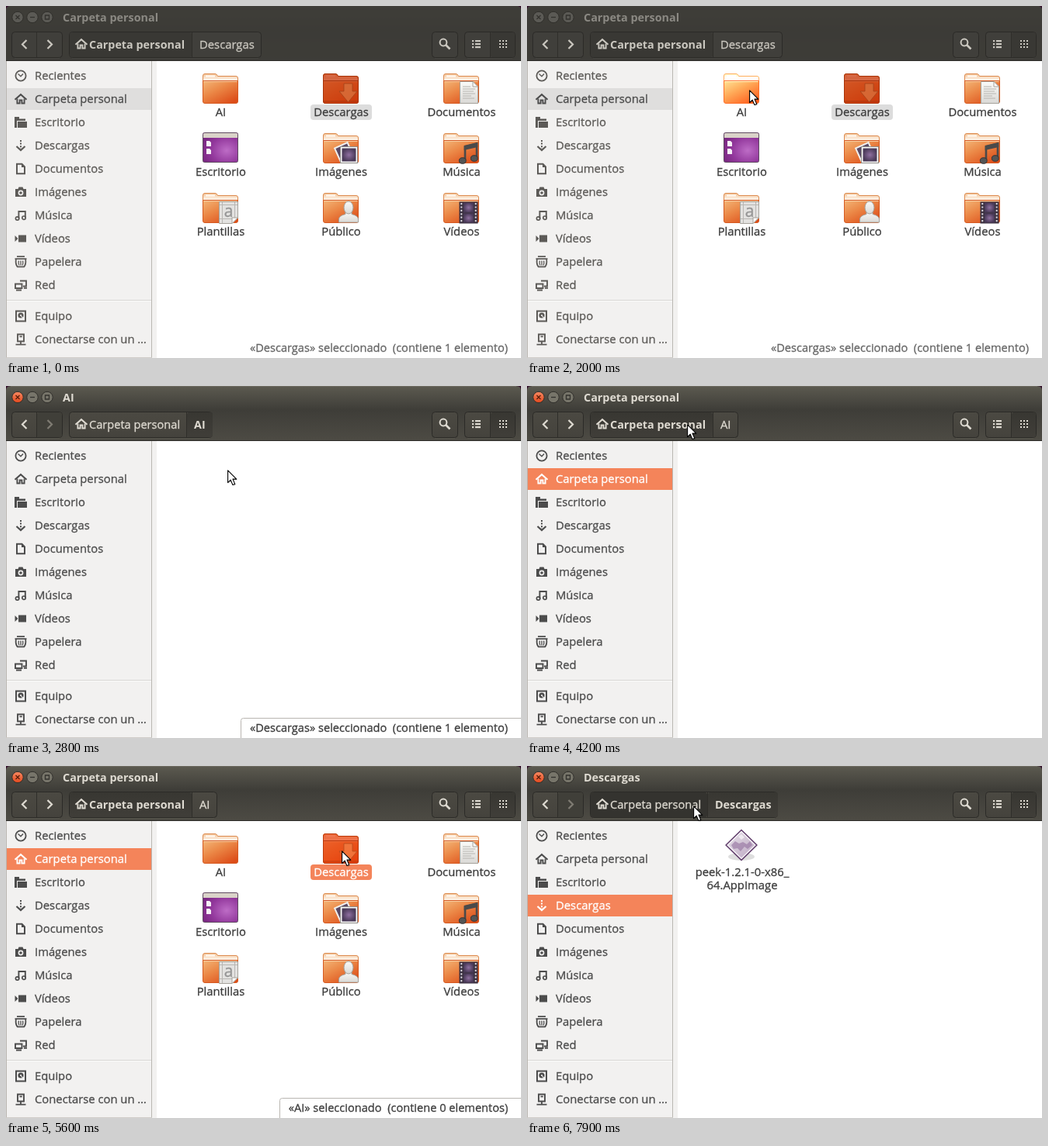
An HTML page that plays this animation: 663 px wide and 454 px high, repeating every 8 s.

```html
<!DOCTYPE html>
<html lang="es">
<head>
<meta charset="utf-8">
<style>
html, body { margin: 0; width: 100%; height: 100%; overflow: hidden; background: #fff; }
svg { display: block; width: 663px; height: 454px; font: 14.8px 'Open Sans', sans-serif; }
.b { font-weight: 700; font-size: 14.35px; stroke: none; }
.m { text-anchor: middle; }
.note { font-size: 14.6px; }
.letter { font-size: 21px; }
</style>
</head>
<body>
<svg viewBox="0 0 663 454">
  <defs>
    <linearGradient id="title" x2="0" y2="1"><stop stop-color="#5c5a50"/><stop offset="1" stop-color="#3e3d38"/></linearGradient>
    <linearGradient id="bar" x2="0" y2="1"><stop stop-color="#3e3d38"/><stop offset="1" stop-color="#4d4b44"/></linearGradient>
    <linearGradient id="btn" x2="0" y2="1"><stop stop-color="#4b4942"/><stop offset="1" stop-color="#45433d"/></linearGradient>
    <linearGradient id="on" x2="0" y2="1"><stop stop-color="#383732"/><stop offset="1" stop-color="#403e39"/></linearGradient>
    <linearGradient id="close" x2="0" y2="1"><stop stop-color="#f88a63"/><stop offset="1" stop-color="#e0481d"/></linearGradient>
    <linearGradient id="back" x2="0" y2="1"><stop stop-color="#f3c396"/><stop offset=".22" stop-color="#fdf3e8"/></linearGradient>
    <linearGradient id="front" x2=".8" y2="1"><stop stop-color="#f3b577"/><stop offset=".45" stop-color="#eb8746"/><stop offset="1" stop-color="#dc4c18"/></linearGradient>
    <radialGradient id="desk" cx=".68" cy=".6" r=".75"><stop stop-color="#bd6cc6"/><stop offset=".6" stop-color="#92389c"/><stop offset="1" stop-color="#782680"/></radialGradient>
    <radialGradient id="photo"><stop stop-color="#8f70a0"/><stop offset="1" stop-color="#4a3a58"/></radialGradient>
    <linearGradient id="paper" x2="0" y2="1"><stop stop-color="#fafaf8"/><stop offset="1" stop-color="#dad9d6"/></linearGradient>
    <linearGradient id="gem" x2="1" y2="1"><stop stop-color="#e9e4ea"/><stop offset="1" stop-color="#b9a3c0"/></linearGradient>
  </defs>
  <g id="scene"></g>
</svg>
<script>
const LOOP = 8000, STEP = 100;
const ORANGE = '#f4845a', INK = '#4c4c4c';
const HOME = 'Carpeta personal';
const scene = document.getElementById('scene');

const rect = (x, y, w, h, fill, more = '') => `<rect x="${x}" y="${y}" width="${w}" height="${h}" fill="${fill}" ${more}/>`;
const path = (d, fill, more = '') => `<path d="${d}" fill="${fill}" ${more}/>`;
const line = (d, color, w = 2, more = '') => path(d, 'none', `stroke="${color}" stroke-width="${w}" ${more}`);
const circle = (x, y, r, fill, more = '') => `<circle cx="${x}" cy="${y}" r="${r}" fill="${fill}" ${more}/>`;
const oval = (x, y, rx, ry, fill, more = '') => `<ellipse cx="${x}" cy="${y}" rx="${rx}" ry="${ry}" fill="${fill}" ${more}/>`;
// A hair of stroke gives the regular weight a little more body
const text = (s, x, y, fill, cls = '') => `<text x="${x}" y="${y}" fill="${fill}" stroke="${fill}" stroke-width=".3" class="${cls}">${s}</text>`;
const at = (x, y, body, more = '', turn = 0) => `<g transform="translate(${x} ${y}) rotate(${turn})" ${more}>${body}</g>`;

// Small symbolic icons, centred on the origin
const sym = {
  clock: c => circle(0, 0, 6.6, 'none', `stroke="${c}" stroke-width="1.8"`) + line('M-3.5-2.5L0 .8L3-2.5', c, 1.4),
  home: c => line('M-7.5.8L0-5.8L7.5.8', c) + line('M-4.6-.5V5.5H-1.4V1.5H1.4V5.5H4.6V-.5', c, 1.9),
  folder: c => path('M-8-7H-2V-4.5H6V-2H-5V7H-8Z', c) + path('M-4-1H8V7H-4Z', c),
  down: c => line('M-5.5 1L0 6L5.5 1', c, 2.2) + line('M0-7V4', c, 2, 'stroke-dasharray="2 1.6"'),
  doc: c => line('M-5-6.2H1.5L5-2.7V6.2H-5Z', c) + path('M1-6V-2H5Z', c),
  camera: c => path('M-7-4H-3.5L-2.5-6.5H2.5L3.5-4H7V6H-7Z', c) + circle(0, 1, 2.6, 'none', 'stroke="#f2f1f0" stroke-width="1.6"'),
  music: c => line('M-2.6 4V-5H5.8V3', c, 1.9) + circle(-4.4, 4, 2.2, 'none', `stroke="${c}" stroke-width="1.7"`) + circle(4, 3.2, 2.2, 'none', `stroke="${c}" stroke-width="1.7"`),
  video: c => rect(-3, -4.5, 10, 9, c) + path('M-7.5-4L-3.5 0L-7.5 4Z', c),
  trash: c => line('M-7.5-3.8H7.5M-5-6.8H5', c, 1.8) + line('M-6.2-3Q-7 3-4.2 6.4H4.2Q7 3 6.2-3', c, 1.8) + line('M-2.6-1.5Q-3.4 2-2 4.5M0-1.5V4.5M2.6-1.5Q3.4 2 2 4.5', c, 1.3),
  net: c => line('M-1-5.5H7V1.5H3M-7-1.5H1.5V4H-7Z', c, 1.9) + line('M-6 6.6H1M4 3.8H8', c, 2),
  disk: c => line('M-6-6.4H6V6.4H-6Z', c, 2) + circle(0, -1, 3.6, c) + line('M0-1L4 4', '#f2f1f0', 1.2) + circle(0, -1, 1, '#f2f1f0'),
  server: c => line('M-4-6.5H4V2.5H-4Z', c, 1.9) + line('M-1.5-3.6H1.8M0 3V7M-6.5 6.6H6.5', c, 1.8)
};

const places = [
  ['clock', 'Recientes'], ['home', HOME], ['folder', 'Escritorio'], ['down', 'Descargas'],
  ['doc', 'Documentos'], ['camera', 'Imágenes'], ['music', 'Música'], ['video', 'Vídeos'],
  ['trash', 'Papelera'], ['net', 'Red'], ['disk', 'Equipo'], ['server', 'Conectarse con un …']
];

const grey = 'stroke="#a5a29b"';

// Emblems, relative to the folder's top left corner
const emblem = {
  Descargas: () => path('M27 13H38V23H44L32.5 37L21 23H27Z', '#d8733f', 'fill-opacity=".75" stroke="#a2421a" stroke-opacity=".75"'),
  Documentos: () => path('M21.5 10.5H38L44.5 17V38.5H21.5Z', 'url(#paper)', grey) + path('M38 10.5V17H44.5Z', '#fff', grey) +
    line('M25 17H35M25 20H41M25 23H39M25 26H41M25 29H36M25 32H40', '#b7b5b0', 1),
  'Imágenes': () => at(27, 24, rect(-9, -9, 18, 18, '#5a4a66', 'stroke="#f0efed" stroke-width="2"'), '', -24) +
    rect(22.5, 17.5, 22, 21, '#fbfbfa', 'stroke="#8f8d89"') + rect(24.5, 19.5, 18, 17, 'url(#photo)'),
  'Música': () => line('M28 34V17L43 13.5V31', '#4a4a4a', 2.6) + path('M26.7 16.5L44.3 12V18L26.7 22Z', '#4a4a4a') +
    oval(24.8, 35.5, 4.4, 3.8, '#555', 'stroke="#333"') + oval(39.8, 32.5, 4.4, 3.8, '#555', 'stroke="#333"'),
  Plantillas: () => path('M21.5 11.5H45.5V32L38 39.5H21.5Z', '#e3e2e0', grey) + line('M25.5 12V39M41.5 12V35M22 15.5H45M22 33.5H42', '#b9b7b4', 1) +
    text('a', 33.5, 31, '#959595', 'm letter') + path('M38 39.5V32H45.5Z', '#fafafa', grey),
  'Público': () => path('M20.5 38V34Q20.5 29.5 29 27.5V24H37V27.5Q45.5 29.5 45.5 34V38Z', 'url(#paper)', grey + ' stroke-linejoin="round"') +
    oval(33, 19, 6, 8, 'url(#paper)', grey),
  'Vídeos': () => rect(20.5, 11.5, 24, 28, '#3b3140') + rect(26, 12.5, 13, 13, 'url(#photo)') + rect(26, 26.5, 13, 12, 'url(#photo)') +
    line('M23.3 13V39M41.7 13V39', '#dcd8e0', 2, 'stroke-dasharray="2.2 2.2"')
};

const BACK = 'M.5 36V3Q.5.5 3 .5H16Q18 .5 18.7 2L19.5 3.5H43Q45.5 3.5 45.5 6V36Z';
const FRONT = 'M.5 9.5H45.5V36Q45.5 38.5 43 38.5H3Q.5 38.5 .5 36Z';

function folder(name, selected) {
  return path(BACK, 'url(#back)', 'stroke="#dc8a4e"') + line('M4 3.5H16', '#fffaf4', 2) +
    path(FRONT, 'url(#front)', 'stroke="#d65a22"') + line('M1.5 10.5H44.5', '#f8cfa4', 1) +
    (selected ? path(BACK + FRONT, '#c63408', 'fill-opacity=".72" stroke="#a83208"') : '') +
    (emblem[name] ? emblem[name]() : '');
}

const desktop = () => rect(.5, -.5, 45, 38, 'url(#desk)', 'rx="2" stroke="#5f4a60"') + path('M1 6V1.5Q1 0 2.5 0H43.5Q45 0 45 1.5V6Z', '#d9d2c8') +
  path('M5 10H9L11 12V17H5ZM5 20H9L11 22V27H5Z', '#f6f0f6');

const names = ['AI', 'Descargas', 'Documentos', 'Escritorio', 'Imágenes', 'Música', 'Plantillas', 'Público', 'Vídeos'];

function files(selected, focus, [cx, cy]) {
  return names.map((name, i) => {
    const x = 253 + 155 * (i % 3), y = 87 + 77 * Math.floor(i / 3);
    const on = name === selected, mid = x + 23.5;
    const hover = cx >= x && cx < x + 46 && cy >= y && cy < y + 39;
    const half = name === 'AI' ? 12 : 39.5;
    const icon = name === 'Escritorio' ? desktop() : folder(name, on);
    return at(x, y, icon, hover ? `style="filter:brightness(${on ? 1.12 : 1.25})"` : '') +
      (on ? rect(mid - half, y + 40, half * 2, 20, focus ? ORANGE : '#dcdcdc', 'rx="4"') : '') +
      text(name, mid, y + 55, on && focus ? '#fff' : '#3c3c3c', 'm');
  }).join('');
}

const appFile = () => oval(276, 117, 17, 5, '#000', 'opacity=".13"') +
  path('M276 82.5L296 102L276 121.5L256 102Z', 'url(#gem)', 'stroke="#5d3a68" stroke-width="1.4" stroke-linejoin="round"') +
  line('M276 84.8L293.6 102L276 119.2L258.4 102Z', '#f5f1f6', 1.2) +
  path('M263 102L268 97L273 100L278 98L283 101L287 97L290 102L284 107L280 104L275 110L271 106L266 107Z', '#92709f', 'opacity=".6"') +
  path('M272 91L276 88L280 92L276 95Z', '#fff', 'opacity=".6"') +
  text('peek-1.2.1-0-x86_', 277, 142, '#3c3c3c', 'm') + text('64.AppImage', 277, 159, '#3c3c3c', 'm');

function sidebar(current, focus) {
  let out = rect(0, 71, 194, 383, '#f2f1f0') + line('M187.5 71V454M.5 71V454', '#bab7b2', 1) + line('M0 453.5H188', '#cfccc8', 1) +
    line('M1 379.5H187', '#d8d6d3', 1) + line('M1 380.5H187', '#fbfbfa', 1);
  places.forEach(([icon, name], i) => {
    const y = 90 + 30 * i + (i > 9 ? 10 : 0), on = name === current;
    const color = on && focus ? '#fff' : focus || on ? INK : '#5c5a57';
    if (on) out += rect(1, y - 14, 186, 28, focus ? ORANGE : '#dfdedd');
    out += at(19, y, sym[icon](color)) + text(name, 37, y + 5, color);
  });
  return out;
}

const divide = x => line(`M${x}.5 34V66`, '#2f2e2a', 1);

function windowButtons(focus) {
  const glyphs = ['M-2.5-2.5L2.5 2.5M2.5-2.5L-2.5 2.5', 'M-3 0H3', 'M-2.5-2.5H2.5V2.5H-2.5Z'];
  return glyphs.map((d, i) => {
    const fill = !focus ? '#5b5a55' : i ? '#77756a' : 'url(#close)';
    const ink = focus && !i ? '#5a1d0a' : '#33322e';
    return at(15 + 19 * i, 14.5, circle(0, 0, 7.2, fill, 'stroke="#302f2b"') + line(d, ink, 1.3));
  }).join('');
}

function header({ title, next, atHome, forward, pressed, focus, fade }) {
  const fg = focus ? '#dfdbd2' : '#cbc8c0';
  const face = focus ? 'url(#btn)' : '#403f3b', sunk = focus ? 'url(#on)' : '#393834';
  const frame = (x, w) => rect(x + .5, 33.5, w, 33, face, 'rx="4" stroke="#2b2a27"') +
    line(`M${x + 4} 67.5H${x + w - 3}`, focus ? '#5a584f' : '#484743', .8);
  const split = atHome ? 239 : 232;
  const end = next === 'AI' ? (atHome ? 271 : 265) : (atHome ? 328 : 322);
  let out = rect(0, 0, 663, 8, '#35102c') + path('M0 31V6Q0 0 6 0H657Q663 0 663 6V31Z', 'url(#title)') + rect(0, 30, 663, 41, 'url(#bar)') +
    line('M6 .5H657', '#6d6a60', 1);
  if (fade) out += path('M0 70V6Q0 0 6 0H657Q663 0 663 6V70Z', '#3c3b37', `opacity="${fade}"`);
  out += line('M0 70.5H663', '#2c2b28', 1) + windowButtons(focus);
  out += text(title, 73, 20, focus ? '#dfdbd2' : '#8b8983', 'b');

  out += frame(7, 65) + (forward ? '' : rect(40, 34, 32, 32, '#403f39', 'rx="3"')) + divide(39) +
    line('M26.5 44L21 49.5L26.5 55', fg, 2.2) + line('M53.5 44L59 49.5L53.5 55', forward ? fg : '#7f7c73', 2.2);

  out += frame(81, end - 81);
  if (atHome || pressed) out += rect(82, 34, split - 82, 32, pressed ? '#34332f' : sunk, 'rx="3"');
  if (!atHome) out += rect(split + 1, 34, end - split, 32, sunk, 'rx="3"');
  out += divide(split) + at(97, 49, sym.home(fg)) + text(HOME, 107, 55, fg, atHome ? 'b' : 'note') +
    text(next, split + 10, 55, fg, atHome ? '' : 'b');

  out += frame(548, 33) + circle(563, 47, 4.4, 'none', `stroke="${fg}" stroke-width="2"`) + line('M566 50L571.5 55.5', fg, 2.6);
  out += frame(590, 65) + rect(624, 34, 31, 32, sunk, 'rx="3"') + divide(623);
  for (const y of [45, 49, 53]) {
    out += rect(600, y - 1, 2.2, 2.2, fg) + rect(604, y - 1, 7, 2.2, fg);
    for (const x of [635, 639, 643]) out += rect(x, y - 1, 2, 2, fg);
  }
  return out;
}

function status(label, note, x, focus) {
  const box = focus ? path(`M${x}.5 455V431.5Q${x}.5 428.5 ${x + 3}.5 428.5H664V455Z`, '#fff', 'stroke="#b9b6b1"') : '';
  return box + text(`«${label}» seleccionado&#160; (${note})`, (x + 658) / 2, 446, focus ? '#3c3c3c' : '#666', 'm note');
}

// Pointer path: time, x, y
const track = [
  [300, 146, -10], [700, 176, 70], [1100, 200, 136], [1300, 217, 143], [1600, 248, 131], [2000, 286, 108],
  [2500, 286, 108], [2600, 285, 108], [3400, 285, 108], [3900, 206, 49], [4300, 206, 49], [4700, 352, 88],
  [5000, 455, 112], [5300, 432, 109], [6700, 432, 109], [6800, 417, 110], [7150, 305, 82], [7500, 214, 51], [LOOP, 214, 51]
];

function pointer(t) {
  if (t < track[0][0]) return [-99, -99];
  const i = track.findIndex(k => k[0] > t);
  const [t0, x0, y0] = track[i - 1], [t1, x1, y1] = track[i];
  const u = (t - t0) / (t1 - t0);
  return [Math.round(x0 + (x1 - x0) * u), Math.round(y0 + (y1 - y0) * u)];
}

const arrow = ([x, y]) => at(x, y,
  path('M1.5 2V18L5.2 14.5L8 21L11 19.7L8.3 13.4H13Z', '#000', 'opacity=".16"') +
  path('M.6.8V16.6L4.2 13.2L6.9 19.6L9.7 18.4L7 12.1H11.8Z', '#fff', 'stroke="#000" stroke-width="1.1" stroke-linejoin="round"'));

function draw(t) {
  const focus = t >= 2600;
  const inAI = t >= 2800 && t < 4200, inDown = t >= 5800, atHome = !inAI && !inDown;
  const title = inAI ? 'AI' : inDown ? 'Descargas' : HOME;
  const next = t >= 2800 && t < 5800 ? 'AI' : 'Descargas';
  const selected = t < 2600 || t >= 5600 ? 'Descargas' : 'AI';
  const pos = pointer(t);
  let out = rect(0, 0, 663, 454, '#fff') + sidebar(inAI ? '' : title, focus);
  if (atHome && !(t >= 4200 && t < 4300)) out += files(selected, focus, pos);
  if (t >= 5900) out += appFile();
  if (t < 2900) out += status('Descargas', 'contiene 1 elemento', 302, focus);
  else if (t >= 4300 && t < 5900) out += status('AI', 'contiene 0 elementos', 352, focus);
  out += header({
    title, next, atHome, focus,
    forward: atHome,
    pressed: t >= 4000 && t < 4200 || t >= 7900,
    fade: focus ? (t < 2700 ? .5 : 0) : .9
  });
  scene.innerHTML = out + arrow(pos);
}

let shown = -1;
const start = performance.now();
function tick() {
  const t = Math.floor((performance.now() - start) % LOOP / STEP) * STEP;
  if (t !== shown) draw(shown = t);
  requestAnimationFrame(tick);
}
tick();
</script>
</body>
</html>
```
